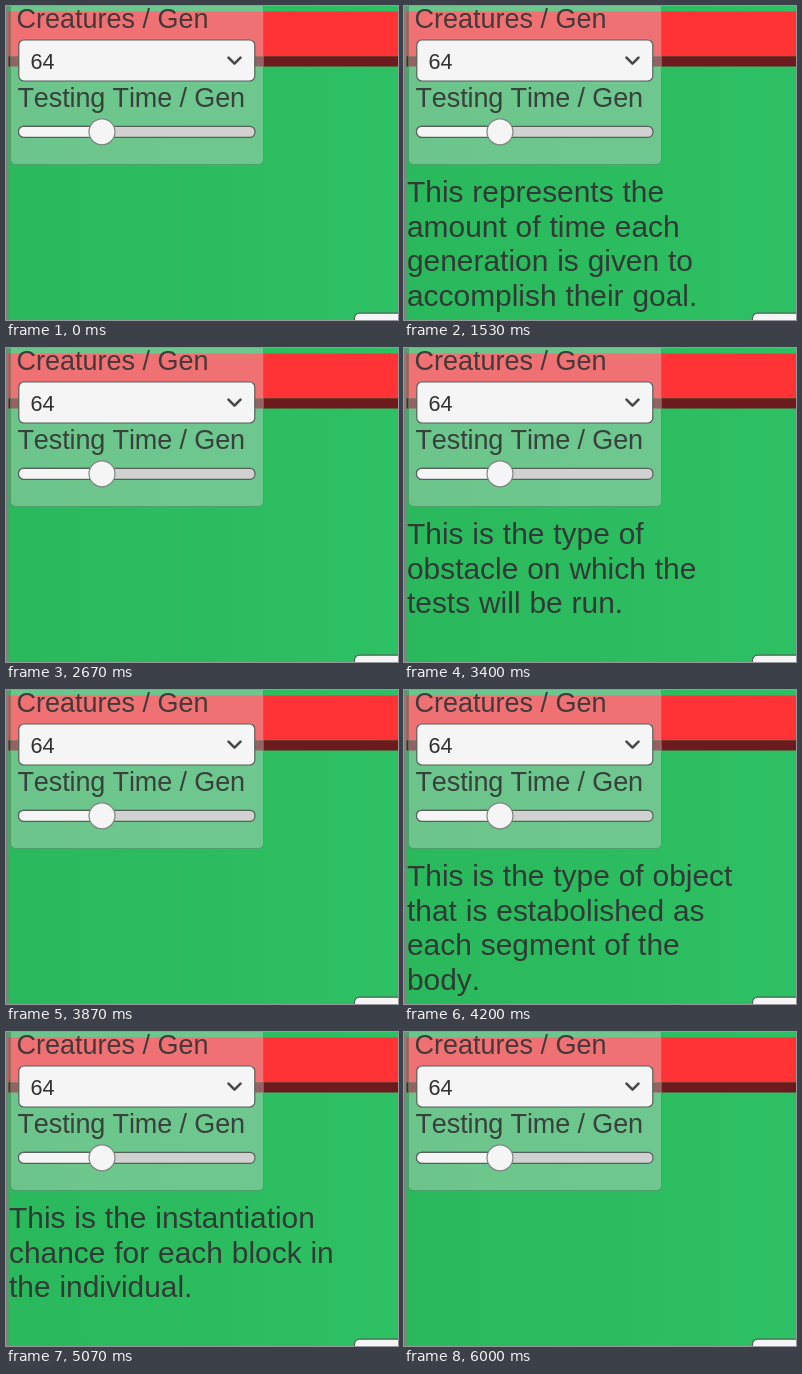
Animation, 392 px wide and 314 px high, one loop 6340 ms. Source, as an HTML page:

```html
<!DOCTYPE html>
<html lang="en">
<head>
<meta charset="utf-8">
<title>Settings tooltips</title>
<style>
  html, body { margin: 0; width: 100%; height: 100%; overflow: hidden; background: #2cbd62; }
  svg { display: block; }
  text { font-family: "Liberation Sans", Arial, sans-serif; font-kerning: none; fill: #323232; }
  .soft { filter: blur(.5px); }
  .label { font-size: 27px; fill-opacity: .9; }
  #tip { font-size: 29.9px; fill-opacity: .94; word-spacing: .6px; }
</style>
</head>
<body>
<svg width="392" height="314" viewBox="0 0 392 314">
  <defs>
    <linearGradient id="grass">
      <stop offset="0" stop-color="#2ab85c"/>
      <stop offset="1" stop-color="#2ec064"/>
    </linearGradient>
  </defs>
  <g class="soft">
    <rect x="-9" y="-9" width="410" height="332" fill="url(#grass)"/>
    <rect x="-9" y="5.5" width="410" height="45" fill="#ff3236"/>
    <rect x="-9" y="50.3" width="410" height="10.2" fill="#6c1a1d"/>
    <rect x="-9" y="-9" width="11.5" height="332" fill="#7b847e"/>

    <rect x="4.5" y="-20" width="253" height="178.5" rx="5" fill="#d8d8d8" fill-opacity=".38" stroke="#4f8a66" stroke-opacity=".6"/>
    <text class="label" x="10.5" y="22">Creatures / Gen</text>
    <text class="label" x="11.5" y="101.3" letter-spacing="-.12">Testing Time / Gen</text>

    <g stroke="#55605a" stroke-width="1.2">
      <rect x="12.8" y="34" width="236" height="41" rx="5" fill="#f5f5f5"/>
      <rect x="12.5" y="120.3" width="236.5" height="11" rx="5" fill="#d0d1d0"/>
      <path d="M96 120.3H17.5a5 5.5 0 0 0 0 11H96" fill="#f5f5f5"/>
      <circle cx="96" cy="125.8" r="13" fill="#f5f5f5" stroke="#7d8580"/>
      <rect x="348.5" y="307.2" width="60" height="30" rx="5" fill="#f5f5f5"/>
    </g>
    <text x="24.5" y="62.5" font-size="21.6">64</text>
    <path d="M222.5 51.7l6 6 6-6" fill="none" stroke="#484848" stroke-width="2.6" stroke-linecap="round" stroke-linejoin="round"/>

    <text id="tip"></text>
  </g>
</svg>
<script>
const LOOP = 6340, LEFT = 3, BASELINE = 196.3, LEADING = 34.5;
const tip = document.getElementById("tip");

// Each tooltip: start ms, end ms, lines
const tips = [
  [1530, 2070, "This represents the|amount of time each|generation is given to|accomplish their goal."],
  [2200, 2670, "This is the number of|creatures in each|generation."],
  [2870, 3400, "This is the chance that|an individual mutates|in a generation."],
  [3400, 3870, "This is the type of|obstacle on which the|tests will be run."],
  [4200, 4600, "This is the type of object|that is estabolished as|each segment of the|body."],
  [4670, 5000, "This is the length of each|individual's body in|segments."],
  [5070, 5600, "This is the instantiation|chance for each block in|the individual."]
];

let shown = "";

function show(message) {
  if (message === shown) return;
  shown = message;
  tip.replaceChildren(...message.split("|").map((line, i) => {
    const span = document.createElementNS("http://www.w3.org/2000/svg", "tspan");
    span.setAttribute("x", LEFT);
    span.setAttribute("y", BASELINE + i * LEADING);
    span.textContent = line;
    return span;
  }));
}

const start = performance.now();

function tick() {
  const t = (performance.now() - start) % LOOP;
  const current = tips.find(([from, to]) => t >= from && t < to);
  show(current ? current[2] : "");
  requestAnimationFrame(tick);
}
tick();
</script>
</body>
</html>
```
